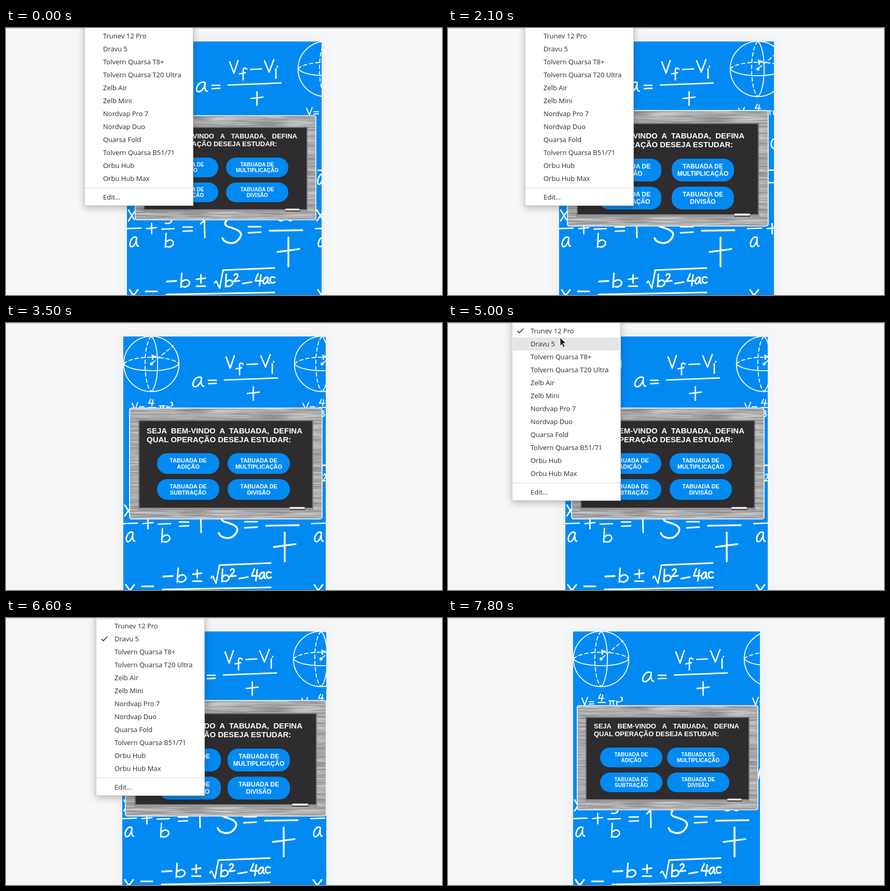
Animation, 840 px wide and 515 px high, one loop 8 s. Source, as an HTML page:

```html
<!DOCTYPE html>
<html lang="pt">
<head>
<meta charset="utf-8">
<title>Tabuada</title>
<style>
html, body { margin: 0; width: 100%; height: 100%; overflow: hidden; }
#stage { position: relative; width: 840px; height: 515px; overflow: hidden; background: #f6f7f9; }
#stage::before { content: ""; position: absolute; width: 100%; height: 1px; background: #c4c6ca; }
#stage div, #stage svg { position: absolute; box-sizing: border-box; }
#glow { top: 26px; height: 540px; box-shadow: 0 0 24px 4px rgba(70, 55, 20, .05); }
#page { top: 26px; height: 489px; overflow: hidden; background: #028af3; }
#doodle { left: 0; top: 0; fill: none; stroke: #fff; stroke-width: 2.7; stroke-linecap: round; stroke-linejoin: round; }
#doodle path { vector-effect: non-scaling-stroke; }
#doodle .globe { stroke-width: 1.8; }
#page div { color: #fff; font-family: "Liberation Sans", Arial, sans-serif; font-weight: 700; }
#head { text-align: justify; }
#page .btn { width: 120px; border-radius: 20px; padding-top: 8px; background: #028af3; text-align: center; }
#menu { top: -60px; width: 210px; height: 403px; background: #fff; border: 1px solid #c6c7c9;
  box-shadow: 0 4px 13px rgba(0, 0, 0, .26); }
#menu div { left: -1px; width: 210px; height: 25px; padding-left: 36px; white-space: nowrap;
  color: #2b2b2b; font: 13px/25px "Open Sans", "Noto Sans", sans-serif; }
#menu .on { background: #e5e7e7; }
#menu .rule { left: 0; top: 367px; width: 208px; height: 1px; background: #d5d6d8; }
#menu .edit { top: 373px; }
#tick { left: 9px; fill: none; stroke: #444; stroke-width: 1.8; }
#touch { width: 23px; height: 23px; border-radius: 50%; background: rgba(90, 90, 90, .42); }
</style>
</head>
<body>
<div id="stage">
  <div id="glow"></div>
  <div id="page">
    <svg id="doodle" width="430" height="489" viewBox="0 26 430 489"></svg>
    <svg id="board" viewBox="0 0 350 202" preserveAspectRatio="none">
      <filter id="grain" x="0" y="0" width="1" height="1" color-interpolation-filters="sRGB">
        <feTurbulence type="fractalNoise" baseFrequency=".014 .36" numOctaves="3" seed="5"/>
        <feColorMatrix type="saturate" values="0"/>
        <feComponentTransfer>
          <feFuncR type="linear" slope=".62" intercept=".36"/>
          <feFuncG type="linear" slope=".62" intercept=".36"/>
          <feFuncB type="linear" slope=".62" intercept=".365"/>
          <feFuncA type="linear" slope="0" intercept="1"/>
        </feComponentTransfer>
        <feComposite in2="SourceGraphic" operator="in"/>
      </filter>
      <rect width="350" height="202" rx="4" filter="url(#grain)"/>
      <rect x="1" y="1" width="348" height="200" rx="4" fill="none" stroke="#e4eff6" stroke-width="1.7"/>
      <rect x="17" y="22.5" width="316" height="162.5" fill="#777678"/>
      <rect x="19" y="24.5" width="312" height="156.5" fill="#2e2c2f"/>
      <rect x="18" y="181" width="314" height="4" fill="#969496"/>
      <rect x="290" y="178" width="28.5" height="7" rx="1.5" fill="#3d3234"/>
      <rect x="290" y="179.5" width="28" height="3.6" rx="1.5" fill="#f0e9e8"/>
    </svg>
    <div id="head">SEJA BEM-VINDO A TABUADA, DEFINA QUAL OPERAÇÃO DESEJA ESTUDAR:</div>
  </div>
  <div id="menu">
    <svg id="tick" width="14" height="12"><path d="M1 6.5L4.5 10L12.5 1.5"/></svg>
  </div>
  <div id="touch"></div>
  <svg id="arrow" width="15" height="22" viewBox="-1 -1 15 22"><path d="M0 0V16L4 13L6 19L9 17L6 11H11Z" fill="#111" stroke="#fff"/></svg>
</div>
<script>
const $ = id => document.getElementById(id);
const place = (el, css) => {
  for (const k in css) el.style[k] = typeof css[k] === 'number' ? css[k] + 'px' : css[k];
};
const add = (parent, cls, html) => {
  const el = document.createElement('div');
  el.className = cls;
  el.innerHTML = html;
  return parent.appendChild(el);
};

// Handwritten glyphs, each in a 10 by 10 box
const glyphs = {
  a: 'M8 1C3 -1 -1 6 1 9C4 11 8 6 8 1Q7 9 10 9',
  b: 'M1 0L0 10M0 7C5 3 12 5 10 8Q6 11 0 9',
  c: 'M10 1Q0 -2 1 6Q3 11 10 8',
  f: 'M10 1Q5 -1 5 2V10M0 5L8 4',
  i: 'M0 2V10M7 0V.5',
  r: 'M1 0L2 10M2 5Q4 1 10 3',
  S: 'M9 0C4 0 0 3 4 4C9 5 12 6 9 8.5C7 10.5 2 10 1 8',
  V: 'M0 1L5 10L10 0',
  x: 'M0 0L8 9M10 0L0 10',
  y: 'M0 0Q9 7 9 0Q12 10 0 9',
  1: 'M0 2L9 0L10 10',
  2: 'M2 2C4 -2 10 1 6 5L1 10L10 9',
  3: 'M1 0Q10 0 4 4Q12 6 1 10',
  4: 'M4 0L0 6H10M8 1L6 10',
  π: 'M0 1H10M3 1L2 10M7 1L8 10',
  '√': 'M0 7Q2 5 3 7L6 10L10 0',
  '+': 'M5 0V10M0 5L10 4',
  '±': 'M5 0V7M0 4L10 3M0 10H10',
  '=': 'M0 1H10M0 10L10 9',
  '-': 'M0 10L10 0'
};
const pen = (glyph, x, y, w, h, weight = 2.7) =>
  `<path d="${glyphs[glyph]}" transform="translate(${x} ${y}) scale(${w / 10} ${h / 10})" stroke-width="${weight}"/>`;
const shift = (x, g) => `<g transform="translate(${x})">${g}</g>`;

// Everything is laid out from the page's left edge
const arcs = (up, left) => `<path d="M1 79A54 ${up} 0 0 1 107 79M54 26A${left} 54 0 0 0 54 132"/>`;
const globe = `<g class="globe"><circle cx="54" cy="79" r="53.3"/><circle cx="54" cy="79" r="2" fill="#fff"/>
  <g transform="rotate(180 54 79)">${arcs(16, 15)}</g>
  <g stroke-dasharray="7 5">${arcs(16, 15)}<path d="M56 77L96 44"/></g></g>` + pen('r', 55, 62, 7, 8);

const volume = [
  pen('V', 17, 153, 11, 15, 2), pen('=', 31, 161, 9, 5, 2), pen(4, 49, 147, 10, 13, 2),
  pen('-', 48, 163, 14, .1, 2), pen(3, 52, 169, 9, 13, 2), pen('π', 69, 159, 11, 8, 2),
  pen('r', 83, 160, 6, 7, 2), pen(3, 91, 153, 6, 8, 2)
].join('');

const speed = [
  pen('a', 133, 103, 22, 21), pen('=', 164, 110, 15, 7), pen('V', 198, 63, 16, 24),
  pen('f', 217, 77, 14, 23), pen('-', 238, 79, 21, 1), pen('V', 265, 61, 18, 24),
  pen('i', 287, 74, 4, 23), pen('-', 195, 106, 102, 4), pen('+', 239, 123, 23, 26)
].join('');

const overA = [
  pen('x', 3, 351, 14, 21), pen('-', 0, 386, 27, 1), pen('a', 5, 402, 17, 21), pen('+', 38, 377, 19, 20)
].join('');

const line = [
  pen('y', 74, 366, 13, 12), pen('-', 67, 387, 24, 1), pen('b', 74, 396, 15, 27),
  pen('=', 108, 383, 18, 9), pen(1, 142, 371, 8, 33, 3), pen('S', 180, 362, 39, 54, 3.6),
  pen('=', 234, 382, 24, 13, 3), pen('-', 275, 390, 63, 1, 3.4), pen('c', 290, 360, 12, 13),
  pen('c', 309, 357, 10, 16), pen('+', 290, 404, 42, 56, 3.4)
].join('');

const roots = [
  pen('-', 77, 488, 18, 1, 3.6), pen('b', 104, 473, 16, 27, 3), pen('±', 134, 476, 17, 22, 3),
  pen('√', 169, 468, 16, 34), pen('-', 185, 463, 99, 4, 3), pen('b', 190, 475, 13, 24, 3),
  pen(2, 204, 474, 13, 15, 3), pen('-', 223, 490, 17, 3, 3), pen(4, 247, 474, 14, 23, 3),
  pen('a', 262, 480, 12, 14, 3), pen('c', 275, 480, 10, 13, 3), pen('-', 76, 510, 208, 4, 3),
  pen('=', 36, 507, 22, 11, 3)
].join('');

const edge = [
  pen('-', 357, 292, 3, 18), pen('-', 368, 274, 52, .5), pen('-', 403, 298, 17, .5),
  pen('a', 367, 281, 13, 22), pen(2, 384, 291, 8, 14, 2), pen('c', 407, 213, 20, 23)
].join('');

const globeRow = globe + volume;
const lowRows = overA + pen('x', 5, 505, 16, 21, 3);
$('doodle').innerHTML = globeRow + shift(329, globeRow) + lowRows + shift(363, lowRows) + speed + line + roots + edge;

const buttons = ['ADIÇÃO', 'MULTIPLICAÇÃO', 'SUBTRAÇÃO', 'DIVISÃO']
  .map(op => add($('page'), 'btn', 'TABUADA DE<br>' + op));

const items = ['', 'Trunev 12 Pro', 'Dravu 5', 'Tolvern Quarsa T8+', 'Tolvern Quarsa T20 Ultra',
  'Zelb Air', 'Zelb Mini', 'Nordvap Pro 7', 'Nordvap Duo', 'Quarsa Fold',
  'Tolvern Quarsa B51/71', 'Orbu Hub', 'Orbu Hub Max'].map((name, i) => {
  const el = add($('menu'), '', name);
  el.style.top = 37 + i * 25 + 'px';
  return el;
});
add($('menu'), 'rule', '');
add($('menu'), 'edit', 'Edit…');
$('menu').append($('tick'));

// Page widths with button font size and column positions
const sizes = [
  { from: 0, w: 375, font: 10, cols: [289, 424] },
  { from: 1200, w: 414, font: 12, cols: [291, 431] },
  { from: 3300, w: 390, font: 11, cols: [291, 427] },
  { from: 5500, w: 393, font: 12, cols: [294, 427] },
  { from: 7600, w: 360, font: 10, cols: [293, 422] }
];
const boardWidth = { 10: 350, 11: 373, 12: 389 };
const lineHeight = { 10: 11, 11: 12, 12: 14 };

// Each menu visit; path points are time, x, y
const visits = [
  { open: 0, close: 1000, x: 151, tick: 0, gone: 1000, path: [[500, 250, -20]] },
  { open: 2100, close: 3200, x: 148, tick: 0, gone: 3500,
    path: [[2400, 262, -20], [2500, 261, 4], [2700, 258, 17], [2900, 257, 20]] },
  { open: 4400, close: 5400, x: 123, tick: 1, gone: 5800,
    path: [[4700, 214, 4], [4800, 214, 4], [5000, 216, 28], [5200, 216, 33], [5500, 216, 33], [5800, 219, 8]] },
  { open: 6400, close: 7500, x: 173, tick: 2, gone: 7800,
    path: [[6600, 256, -20], [6700, 256, -20], [6800, 256, 6], [7300, 259, 61], [7600, 266, 55], [7700, 260, 24]] }
];

function pointer({ path, gone }, t) {
  const i = path.findLastIndex(p => p[0] <= t);
  if (i < 0 || t >= gone) return null;
  const a = path[i], b = path[i + 1] || a;
  const k = (t - a[0]) / (b[0] - a[0] || 1);
  return { x: a[1] + (b[1] - a[1]) * k, y: a[2] + (b[2] - a[2]) * k };
}

function layout({ w, font, cols }) {
  const left = Math.floor(421 - w / 2);
  const bw = boardWidth[font], lh = lineHeight[font], height = lh * 2 + 16;
  place($('glow'), { left, width: w });
  place($('page'), { left, width: w });
  place($('board'), { left: Math.floor(423.5 - bw / 2) - left, top: 192 - 5 * font, width: bw, height: Math.round(bw * .579) });
  place($('head'), font === 10
    ? { left: 281 - left, top: 175, width: 280, fontSize: 13, lineHeight: '15px' }
    : { left: 271 - left, top: 173, width: 300, fontSize: 15, lineHeight: '17px' });
  buttons.forEach((el, i) => place(el, {
    left: cols[i % 2] - left, top: 214 + font + (i >> 1) * (height + 10),
    height, fontSize: font, lineHeight: lh + 'px'
  }));
}

function show(t) {
  layout(sizes.findLast(s => s.from <= t));
  const visit = visits.findLast(v => v.open <= t);
  const open = t < visit.close;
  const at = pointer(visit, t);
  const hover = at ? Math.floor((at.y + 22) / 25) : -1;
  place($('menu'), { left: visit.x, display: open ? 'block' : 'none' });
  place($('tick'), { top: 43 + visit.tick * 25, display: visit.tick ? 'block' : 'none' });
  items.forEach((el, i) => el.classList.toggle('on', i === hover));
  place($('arrow'), { display: at && open ? 'block' : 'none' });
  place($('touch'), { display: at && !open ? 'block' : 'none' });
  if (at) {
    place($('arrow'), { left: at.x - 1, top: at.y - 1 });
    place($('touch'), { left: at.x - 11, top: at.y - 11 });
  }
}

const start = performance.now();
let shown = -1;
function frame(now) {
  const t = Math.floor(Math.max(0, now - start) % 8000 / 100) * 100;
  if (t !== shown) show(shown = t);
  requestAnimationFrame(frame);
}
frame(start);
</script>
</body>
</html>
```
